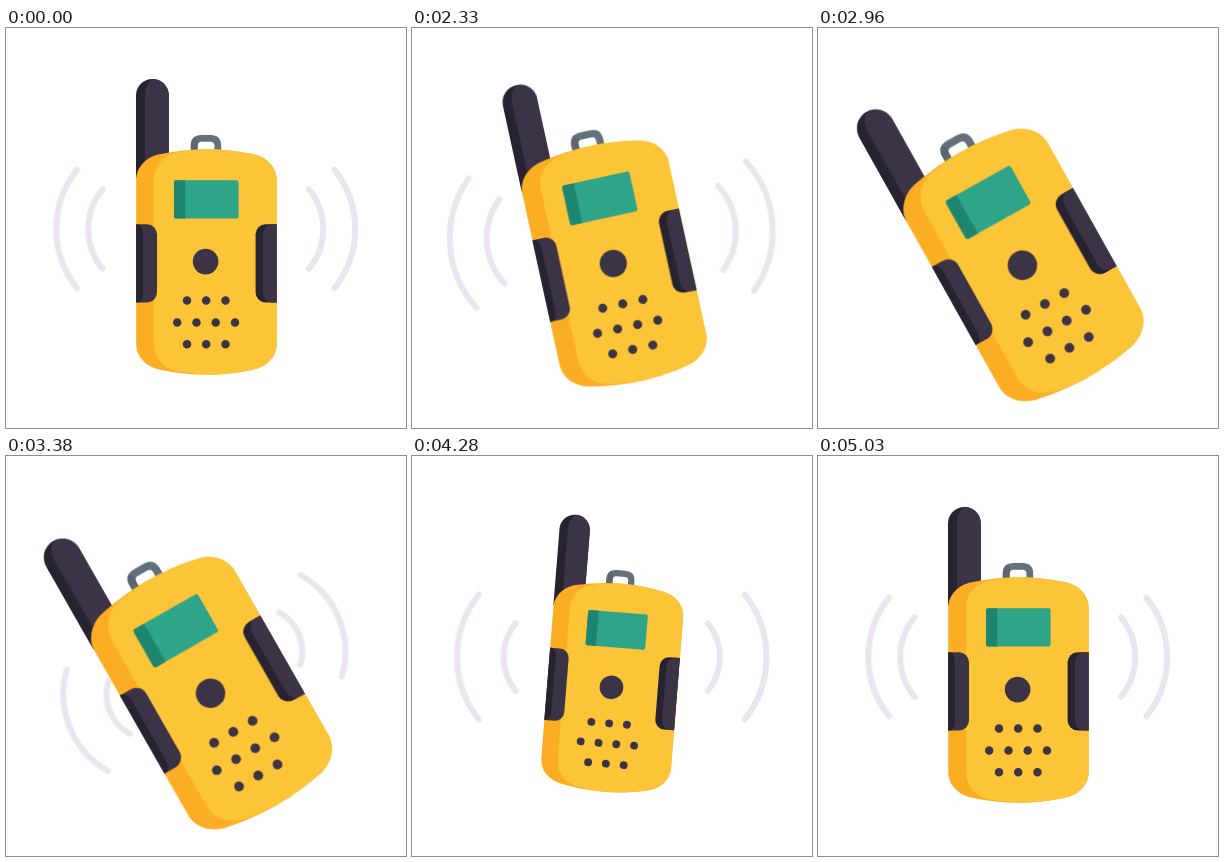
An HTML page that plays this animation: 400x400 px, repeating every 5.06 s.

```html
<!DOCTYPE html>
<html lang="en">
<head>
<meta charset="utf-8">
<title>Walkie-talkie</title>
<style>
html, body { margin: 0; width: 100%; height: 100%; overflow: hidden; background: #fff; }
svg { display: block; width: 400px; height: 400px; }

.device {
  transform-origin: 206px 225px;
  animation: tilt 5060ms linear infinite, grow 5060ms linear infinite;
}
.waves {
  fill: none; stroke: #e9e4ed; stroke-width: 6; stroke-linecap: round;
  transform-origin: 199.75px 201px;
  animation: drift 5060ms linear infinite, fade 5060ms linear infinite;
}
.waves path { transform-origin: 254.5px 201px; vector-effect: non-scaling-stroke; }
.near { animation: near 5060ms linear infinite; }
.far { animation: far 5060ms linear infinite; }

.ink { fill: #3c3446; }
.ink-dark { fill: #272230; }

@keyframes tilt {
  0% { rotate: 0deg; translate: 0 0; }
  40.12% { rotate: 0deg; translate: 0 0; animation-timing-function: cubic-bezier(.3,.35,.5,1); }
  61.27%, 68.77% { rotate: -29.7deg; translate: 0 0; animation-timing-function: cubic-bezier(.5,0,.5,1); }
  86.17% { rotate: 5deg; translate: 0 -1.2px; animation-timing-function: cubic-bezier(.4,0,.5,1); }
  99.41%, 100% { rotate: 0deg; translate: 0 0; }
}
@keyframes grow {
  0% { scale: 1; }
  40.12% { scale: 1; animation-timing-function: cubic-bezier(.3,.35,.5,1); }
  60%, 66.6% { scale: 1.15; animation-timing-function: cubic-bezier(.5,0,.5,1); }
  84.9% { scale: .926; animation-timing-function: cubic-bezier(.4,0,.5,1); }
  99.41%, 100% { scale: 1; }
}
@keyframes drift {
  0% { translate: 0 0; rotate: 0deg; scale: 1; }
  40.12% { translate: 0 0; rotate: 0deg; scale: 1; animation-timing-function: cubic-bezier(.4,0,.8,.75); }
  51.38% { translate: -1.4px 16px; rotate: -10deg; scale: 1.165; }
  53.75% { translate: -1.4px 16px; rotate: -12deg; scale: 1.2; }
  57.31% { translate: -1.4px 16px; rotate: -15deg; scale: 1; }
  66.8% { translate: -1.4px 16px; rotate: -22deg; scale: 1.05; }
  72.73% { translate: -1.4px 16px; rotate: -24deg; scale: 1.15; }
  76.68%, 100% { translate: 0 0; rotate: 0deg; scale: 1; }
}
@keyframes fade {
  0%, 53.4% { opacity: 1; }
  55%, 57.3% { opacity: 0; }
  57.4%, 72.6% { opacity: 1; }
  73.9%, 76.6% { opacity: 0; }
  76.8%, 100% { opacity: 1; }
}
@keyframes far {
  0% { scale: 1; }
  40.12% { scale: 1; animation-timing-function: cubic-bezier(.4,0,.8,.75); }
  51.38% { scale: 1.1; }
  53.75%, 55.3% { scale: 1.15; animation-timing-function: step-end; }
  57.31% { scale: .01; animation-timing-function: cubic-bezier(.3,.4,.7,.8); }
  66.8% { scale: .88; }
  72.73%, 74% { scale: 1.21; animation-timing-function: step-end; }
  76.68% { scale: .01; animation-timing-function: cubic-bezier(.3,.4,.7,.9); }
  84.59% { scale: 1.055; animation-timing-function: ease-out; }
  86.96% { scale: 1.12; animation-timing-function: ease-in-out; }
  94%, 100% { scale: 1; }
}
@keyframes near {
  0% { scale: 1; }
  40.12% { scale: 1; animation-timing-function: cubic-bezier(.4,0,.8,.75); }
  51.38% { scale: 1.015; }
  53.75%, 55.3% { scale: 1.06; animation-timing-function: step-end; }
  57.31% { scale: .01; }
  59.68% { scale: .01; animation-timing-function: cubic-bezier(.3,.4,.7,.8); }
  66.8% { scale: .675; }
  72.73%, 74% { scale: 1.12; animation-timing-function: step-end; }
  76.68% { scale: .01; }
  78.66% { scale: .01; animation-timing-function: cubic-bezier(.3,.4,.7,.9); }
  84.59% { scale: .85; animation-timing-function: ease-out; }
  88.54% { scale: 1.1; animation-timing-function: ease-in-out; }
  95.5%, 100% { scale: 1; }
}
</style>
</head>
<body>
<svg viewBox="0 0 400 400">
  <g class="waves">
    <g>
      <path class="near" d="M303 161.3A62.5 62.5 0 0 1 303 240.7"/>
      <path class="far" d="M328.5 141.8A95 95 0 0 1 328.5 260.2"/>
    </g>
    <g transform="matrix(-1 0 0 1 399.5 0)">
      <path class="near" d="M303 161.3A62.5 62.5 0 0 1 303 240.7"/>
      <path class="far" d="M328.5 141.8A95 95 0 0 1 328.5 260.2"/>
    </g>
  </g>

  <g class="device">
    <!-- antenna and strap ring -->
    <path class="ink-dark" d="M130 150V67.3a16.4 16.4 0 0 1 32.8 0V150Z"/>
    <path class="ink" d="M139 150V67.3C139 59 142 53.5 147.5 51A16.4 16.4 0 0 1 162.8 67.3V150Z"/>
    <g fill="none" stroke-width="6.8">
      <path stroke="#64707c" d="M188.2 126V117.5Q188.2 110.3 195.4 110.3H204.6Q211.8 110.3 211.8 117.5V126"/>
      <path stroke="#5b6671" d="M188.2 126V117.5Q188.2 113 191 111.3"/>
    </g>

    <!-- body -->
    <path fill="#fbae24" d="M130.2 152C130.2 139.5 140 128.5 155 126Q200.5 116.5 246 126C261 128.5 270.7 139.5 270.7 152V316C270.7 328.5 261 339 246 342Q200.5 351.5 155 342C140 339 130.2 328.5 130.2 316Z"/>
    <path fill="#fcc538" d="M148 153C148 137 158 127 172 124.5Q186 121.7 200.5 121.2Q224 121.4 246 126C261 128.5 270.7 139.5 270.7 152V316C270.7 328.5 261 339 246 342Q224 346.6 200.5 346.8Q186 346 172 343.3C158 340.5 148 331 148 315Z"/>

    <!-- grips -->
    <path class="ink" d="M130.2 196.3H141a10 10 0 0 1 10 10V264.5a10 10 0 0 1-10 10H130.2Z"/>
    <path class="ink-dark" d="M130.2 196.3H132Q137 198 137 206V265Q137 273 132 274.5H130.2Z"/>
    <path class="ink-dark" d="M270.7 196.3H259.6a10 10 0 0 0-10 10V264.5a10 10 0 0 0 10 10H270.7Z"/>
    <path class="ink" d="M270.7 196.3H266a9 10 0 0 0-9 10V264.5a9 10 0 0 0 9 10H270.7Z"/>

    <!-- screen -->
    <rect x="168" y="152.3" width="64.6" height="38.2" rx="2" fill="#2ea489"/>
    <path fill="#1d8570" d="M179.3 152.3H170a2 2 0 0 0-2 2V188.5a2 2 0 0 0 2 2H179.3Z"/>

    <!-- button and speaker -->
    <circle class="ink" cx="199.6" cy="233.6" r="12.8"/>
    <g fill="none" stroke="#3c3446" stroke-width="8.5" stroke-linecap="round">
      <path d="M181 272.6h0M200.2 272.6h0M219.5 272.6h0"/>
      <path d="M171.2 294.5h0M190.5 294.5h0M209.7 294.5h0M229 294.5h0"/>
      <path d="M181 316.3h0M200.2 316.3h0M219.5 316.3h0"/>
    </g>
  </g>
</svg>
</body>
</html>
```
